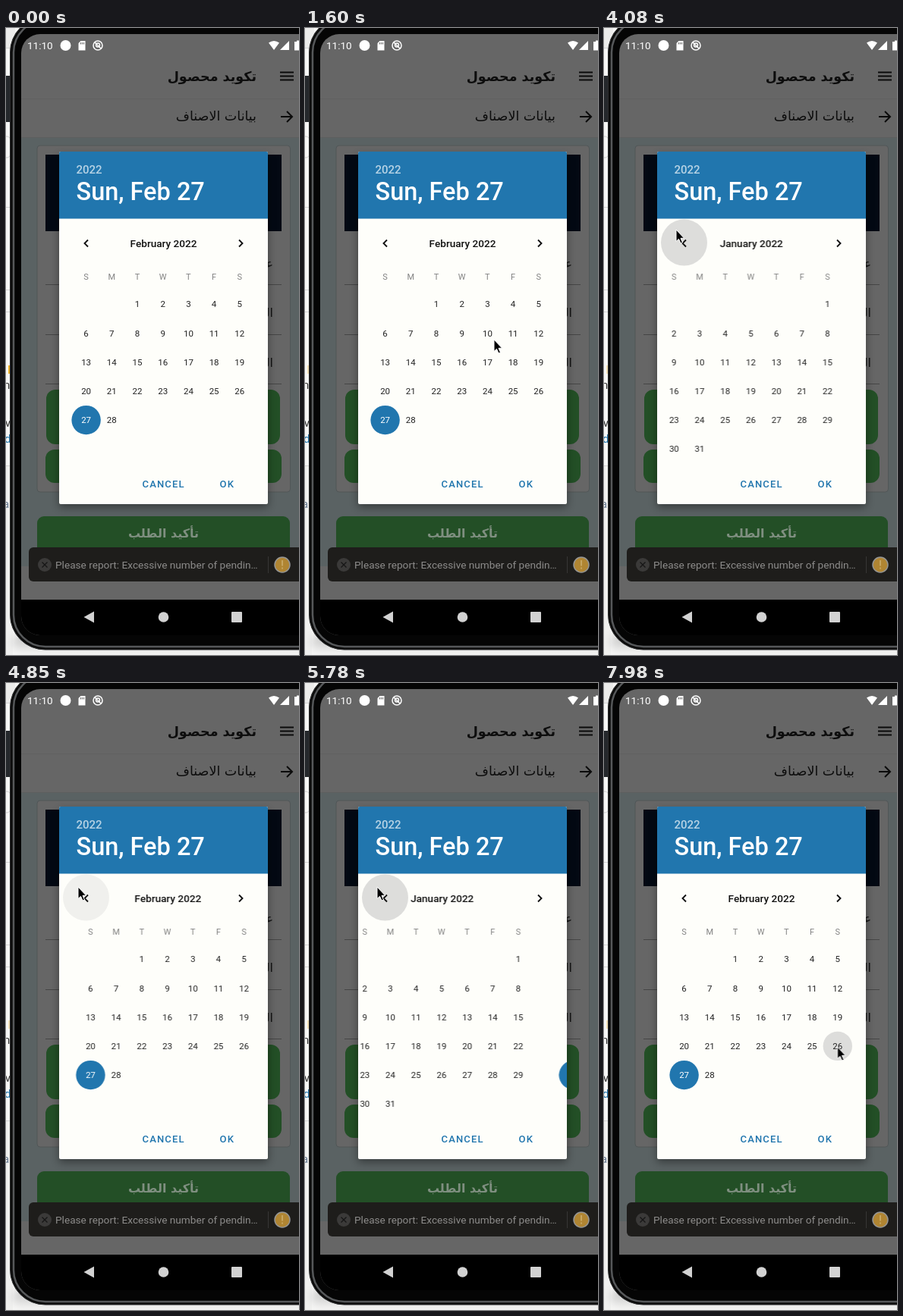
Write an HTML page that moves like this. It is 386 px wide and 827 px high and loops after 8000 ms.

```html
<!DOCTYPE html>
<html lang="en">
<head>
<meta charset="utf-8">
<title>Date picker</title>
<style>
html, body { margin: 0; width: 100%; height: 100%; overflow: hidden; background: #f6f6f5; }
svg { display: block; width: 386px; height: 827px; font-family: Roboto, sans-serif; }
.ar { font-family: "DejaVu Sans", sans-serif; direction: rtl; }
.mid { text-anchor: middle; }
.bold { font-weight: 700; }
.med { font-weight: 500; }
.day { font-size: 11.5px; fill: #222; }
.week { font-size: 11px; fill: #828282; }
.month { font-size: 13.6px; font-weight: 500; fill: #111; }
.title { font-size: 32.5px; font-weight: 500; fill: #fff; }
.action { font-size: 13px; font-weight: 500; letter-spacing: 1.15px; fill: #2176ae; }
.edge { font-size: 15px; }

/* Percent = milliseconds / 80 */
.pick, .press, #cursor, #seen, #hot { animation: 8s step-end infinite; opacity: 0; }
#cursor { opacity: 1; animation-name: move; }
#seen { animation-name: seen; }
#hot { animation-name: hot; }
#pages { animation: slide 8s linear infinite; }
#ripple { animation: ripple 8s linear infinite; opacity: 0; }

@keyframes hot { 0% { opacity: 1 } 5%, 100% { opacity: .3 } }
@keyframes seen { 0% { opacity: 0 } 5% { opacity: 1 } 81.625% { opacity: 0 } 85.375%, 100% { opacity: 1 } }
@keyframes move {
  0% { transform: translate(386px, 470px) }
  5% { transform: translate(386px, 470px); animation-timing-function: steps(6, jump-start) }
  11.25% { transform: translate(276px, 406px) }
  20% { transform: translate(249px, 411px) }
  28.125% { transform: translate(148px, 376px) }
  31.875% { transform: translate(148px, 376px); animation-timing-function: steps(2, jump-start) }
  34.375% { transform: translate(167px, 356px) }
  39.375% { transform: translate(169px, 356px) }
  40% { transform: translate(171px, 356px) }
  42.25% { transform: translate(171px, 356px); animation-timing-function: steps(5, jump-start) }
  48.5% { transform: translate(95px, 266px) }
  60.625% { transform: translate(95px, 269px) }
  85.375% { transform: translate(345px, 530px) }
  86.625% { transform: translate(345px, 530px); animation-timing-function: steps(3, jump-start) }
  90.375%, 100% { transform: translate(307.5px, 480px) }
}
@keyframes slide {
  0%, 52.44%, 63.32%, 73.94%, 100% { transform: translateX(0) }
  49.75%, 60.625%, 71.25% { transform: translateX(0); animation-timing-function: cubic-bezier(.22, 1, .36, 1) }
  52.43%, 63.31%, 73.93% { transform: translateX(275px) }
}
@keyframes ripple {
  0%, 49.74%, 53.5%, 60.615%, 64.6%, 71.24%, 75.2%, 100% { opacity: 0 }
  49.75%, 60.625%, 71.25% { opacity: .4 }
  50.5%, 52.375%, 61.375%, 63.25%, 72%, 73.875% { opacity: 1 }
}
@keyframes press11 { 0% { opacity: 0 } 11.75% { opacity: 1 } 12.75%, 100% { opacity: 0 } }
@keyframes pick11 { 0% { opacity: 0 } 12.75% { opacity: 1 } 15.625%, 100% { opacity: 0 } }
@keyframes press10 { 0% { opacity: 0 } 21.25% { opacity: 1 } 22.25%, 100% { opacity: 0 } }
@keyframes pick10 { 0% { opacity: 0 } 22.25% { opacity: 1 } 25%, 100% { opacity: 0 } }
@keyframes press1 { 0% { opacity: 0 } 35.375% { opacity: 1 } 36%, 100% { opacity: 0 } }
@keyframes pick1 { 0% { opacity: 0 } 36% { opacity: 1 } 37.5%, 100% { opacity: 0 } }
@keyframes press26 { 0% { opacity: 0 } 91% { opacity: 1 } 92.5% { opacity: 0 } 99.75%, 100% { opacity: 1 } }
@keyframes pick26 { 0% { opacity: 0 } 92.5% { opacity: 1 } 94.75%, 100% { opacity: 0 } }
</style>
</head>
<body>
<svg viewBox="0 0 386 827">
  <defs>
    <clipPath id="screen"><rect x="20" y="8" width="420" height="793" rx="25"/></clipPath>
    <clipPath id="sheet"><rect x="70" y="251" width="275" height="330"/></clipPath>
    <linearGradient id="under" x2="0" y2="1"><stop offset="0" stop-color="#bbb"/><stop offset="1" stop-color="#f1f1f0"/></linearGradient>
    <filter id="soft" x="-20%" y="-20%" width="140%" height="140%"><feGaussianBlur stdDeviation="6"/></filter>
  </defs>

  <!-- Window behind the phone -->
  <rect width="386" height="827" fill="#f8f8f7"/>
  <rect width="12" height="26" fill="#ececeb"/>
  <rect y="63" width="12" height="61" fill="#25282c"/>
  <rect x="-9" y="143" width="15" height="28" rx="5" fill="none" stroke="#cfcfcf"/>
  <path d="M0 26.500H9M0 236.500H9M0 345.500H9M0 374.500H9M0 577.500H9" stroke="#d5d5d5"/>
  <rect y="578" width="9" height="249" fill="#f1f1f0"/>
  <rect id="hot" x="3" y="445" width="3" height="11" fill="#f0b429"/>
  <g class="edge" fill="#333">
    <text x="-3" y="476">n</text><text x="-9" y="526">ev</text>
    <text x="-2" y="547" fill="#2176ae">d</text><text x="-4" y="633" fill="#66788f">a</text>
  </g>

  <!-- Phone -->
  <rect x="8" y="800" width="400" height="24" rx="12" fill="url(#under)" filter="url(#soft)"/>
  <rect x="5.500" y="-14" width="440" height="834" rx="46" fill="#0c0c0c" stroke="#2e2f30"/>
  <rect x="10" y="-10" width="440" height="826" rx="42" fill="#050505" stroke="#56585a" stroke-width="2.500"/>

  <g clip-path="url(#screen)">
    <rect x="20" y="8" width="366" height="793" fill="#666"/>
    <rect x="20" y="144" width="366" height="566" fill="#5a6263"/>
    <path d="M20 93.500H386" stroke="#606060"/>
    <path d="M20 144.500H386" stroke="#5d5f5f"/>
    <rect x="20" y="754" width="366" height="50" fill="#000"/>

    <!-- Status bar -->
    <g fill="#fff">
      <text x="28" y="28" font-size="13.500">11:10</text>
      <circle cx="78.500" cy="23" r="7"/>
      <path d="M98.500 17H104.500V29.500H95.500V20Z"/>
      <path d="M346 19.500Q353 14.500 360 19.500L353 29Z"/>
      <path d="M361 29L373 17V29Z"/>
      <path d="M380 18H383V16.500H387V29.500H380Z"/>
    </g>
    <path d="M98.500 19V21.500M100.500 19V21.500M102.500 19V21.500" stroke="#666"/>
    <g fill="none" stroke="#fff" stroke-width="1.500">
      <circle cx="121" cy="23" r="6"/><circle cx="121" cy="22.500" r="2.500"/><path d="M117 19L125 27"/>
    </g>

    <!-- App bars -->
    <g class="ar" fill="#0d0d0d">
      <text class="bold" x="330" y="70" font-size="17.500">تكويد محصول</text>
      <text x="330" y="122" font-size="17.500">بيانات الاصناف</text>
    </g>
    <g fill="none" stroke="#0b0b0b" stroke-width="2">
      <path d="M361 58.500H379M361 63.500H379M361 68.500H379"/>
      <path d="M362 117H377M370 110L377 117L370 124"/>
    </g>

    <!-- Form -->
    <rect x="41" y="155" width="333.500" height="457" rx="4" fill="#666" stroke="#505657"/>
    <rect x="52" y="167" width="311" height="101" fill="#030913"/>
    <path d="M52 338.500H363M52 404.500H363M52 469.500H363" stroke="#454545"/>
    <g class="ar" font-size="16" fill="#141414">
      <text x="352" y="316">عدد</text><text x="352" y="381">الكمية</text><text x="352" y="447">السعر</text>
    </g>
    <g fill="#234f26">
      <rect x="53" y="477" width="308" height="72" rx="12"/>
      <rect x="52" y="556" width="311" height="44" rx="12"/>
      <rect x="41" y="644" width="333" height="52" rx="9"/>
    </g>
    <text class="ar bold mid" x="207.500" y="672" font-size="16" fill="#7f8f80">تأكيد الطلب</text>

    <!-- Toast -->
    <rect x="30" y="685" width="366" height="45" rx="6" fill="#1e1d1b"/>
    <circle cx="51" cy="708" r="9" fill="#3b3a39"/>
    <path d="M47.500 704.500L54.500 711.500M54.500 704.500L47.500 711.500" stroke="#161616" stroke-width="1.300"/>
    <text x="65" y="713" font-size="13.650" fill="#8c8b8a">Please report: Excessive number of pendin…</text>
    <path d="M345.500 697V719" stroke="#373635"/>
    <circle cx="364" cy="708" r="10" fill="#b08532" stroke="#969694" stroke-width="1.500"/>
    <path d="M364 702V709.500M364 711.500V713.500" stroke="#cdb070" stroke-width="1.500"/>

    <!-- Navigation -->
    <g fill="#d2d2d2">
      <path d="M102.500 777L116 769.500V784.500Z"/>
      <circle cx="207.500" cy="777" r="6.800"/>
      <rect x="297" y="770" width="14" height="14" rx="1"/>
    </g>
  </g>

  <!-- Dialog -->
  <rect x="70" y="169" width="275" height="463" fill="#000" opacity=".4" filter="url(#soft)"/>
  <rect x="70" y="163" width="275" height="465" rx="2" fill="#fefefa"/>
  <path d="M70 251.500V165Q70 163 72 163H343Q345 163 345 165V251.500Z" fill="#2176ae"/>
  <text class="med" x="92.500" y="192" font-size="15" fill="#b7d3e5">2022</text>
  <text class="title" x="92.500" y="227">Sun, Feb 27</text>
  <circle id="ripple" cx="105.500" cy="283" r="30.500" fill="#dddddb"/>
  <g clip-path="url(#sheet)"><g id="pages"></g></g>
  <path d="M108 279.500L103.500 284L108 288.500M307 279.500L311.500 284L307 288.500" fill="none" stroke="#111" stroke-width="1.900"/>
  <text class="action" x="179.500" y="606">CANCEL</text>
  <text class="action" x="281.500" y="606">OK</text>
  <g id="picks"></g>

  <g id="cursor"><g id="seen">
    <path d="M0 0V15.500L3.500 12.300L6 18L8.500 17L6 11.300H10.600Z" fill="#000" stroke="#fff" stroke-width="1"/>
  </g></g>
</svg>
<script>
const put = (id, html) => { document.getElementById(id).innerHTML = html; };
const colX = c => 105.6 + 33.7 * c;
const rowY = r => 364.2 + 38.2 * r;
const text = (cls, x, y, s, extra = "") => `<text class="${cls} mid" x="${x}" y="${y}" ${extra}>${s}</text>`;

// First weekday column of the month places every day
function place(day, first) {
  const i = day - 1 + first;
  return [colX(i % 7), rowY(Math.floor(i / 7))];
}
function cell(day, first, disc, ink = "#222") {
  const [x, y] = place(day, first);
  const circle = disc ? `<circle cx="${x}" cy="${y + .1}" r="19.2" fill="${disc}"/>` : "";
  return circle + text("day", x, y + 4.2, day, `style="fill:${ink}"`);
}
function month(name, first, count, shift, chosen) {
  let out = text("month", 207.5, 289, name);
  [..."SMTWTFS"].forEach((d, c) => { out += text("week", colX(c), 332, d); });
  for (let d = 1; d <= count; d++)
    out += d === chosen ? cell(d, first, "#2176ae", "#fff") : cell(d, first);
  return `<g transform="translate(${shift})">${out}</g>`;
}
put("pages", month("January 2022", 6, 31, -275) + month("February 2022", 2, 28, 0, 27));

const weekday = ["Mon", "Tue", "Wed", "Thu", "Fri", "Sat", "Sun"];
put("picks", [11, 10, 1, 26].map(d => `
  <g class="press" style="animation-name:press${d}">${cell(d, 2, "#dddddb")}</g>
  <g class="pick" style="animation-name:pick${d}">
    <rect x="90" y="197" width="190" height="42" fill="#2176ae"/>
    <text class="title" x="92.5" y="227">${weekday[d % 7]}, Feb ${d}</text>
    <circle cx="105.6" cy="517.1" r="20" fill="#fefefa"/>${cell(27, 2)}
    ${cell(d, 2, "#2176ae", "#fff")}
  </g>`).join(""));
</script>
</body>
</html>
```
